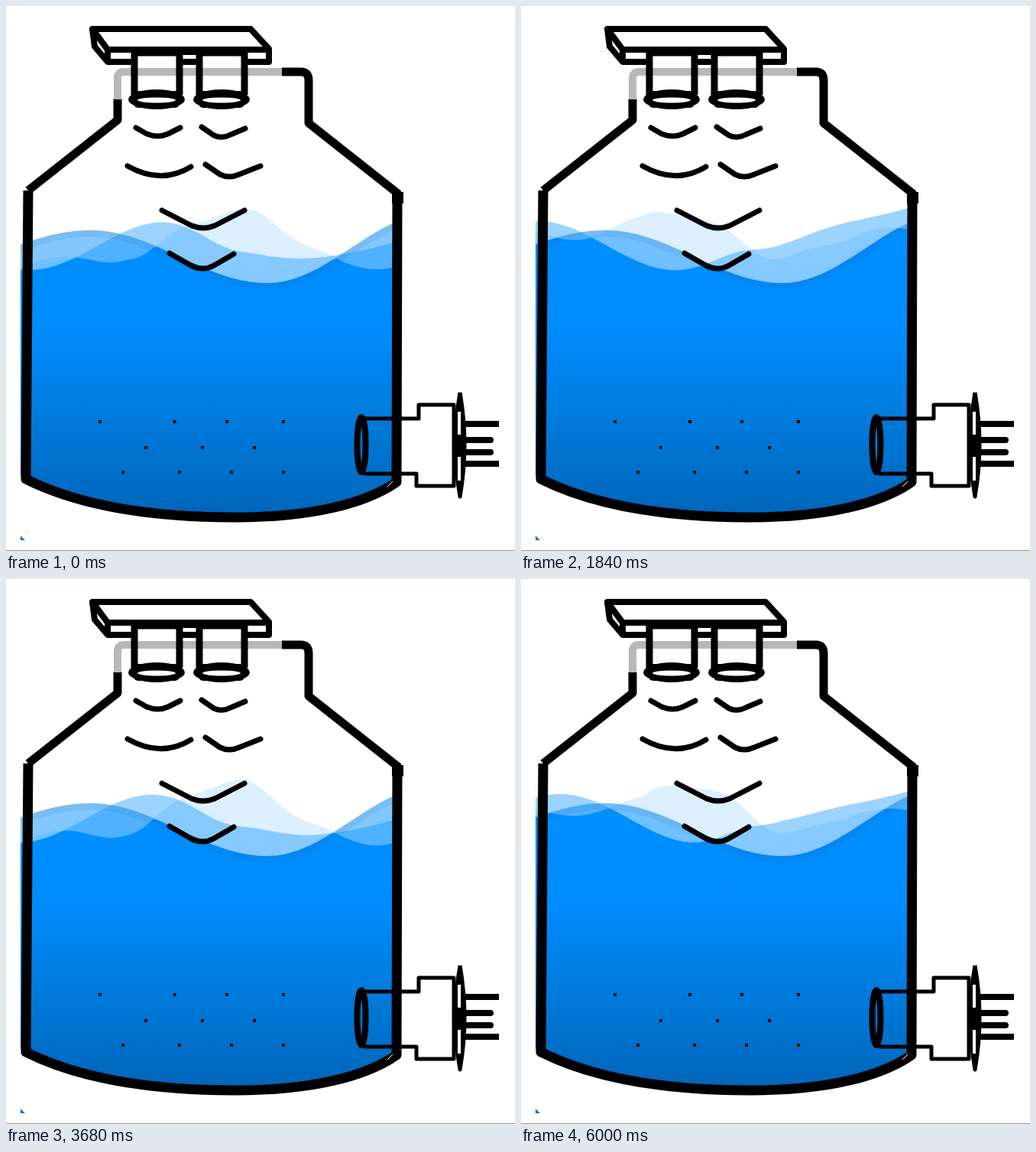
Recreate the animation shown at these times as an HTML page. Size 666x712 px, loop 6080 ms.

```html
<!DOCTYPE html>
<html lang="en">
<head>
<meta charset="utf-8">
<title>Water tank level sensor</title>
<style>
html, body { margin: 0; width: 100%; height: 100%; overflow: hidden; background: #fff; }
svg { display: block; width: 666px; height: 712px; }
.line { fill: none; stroke: #000; stroke-linejoin: round; }
.round { stroke-linecap: round; }
.soft { filter: blur(.7px); }
</style>
</head>
<body>
<svg viewBox="0 0 666 712">
  <defs>
    <linearGradient id="deep" gradientUnits="userSpaceOnUse" x1="0" y1="280" x2="0" y2="672">
      <stop offset="0" stop-color="#0090ff"/>
      <stop offset=".36" stop-color="#008cfd"/>
      <stop offset=".66" stop-color="#007bdc"/>
      <stop offset="1" stop-color="#0064b8"/>
    </linearGradient>
    <clipPath id="inside">
      <path d="M19 200H507V622C470 650 400 668 300 668C180 668 90 650 26 618L19 613Z"/>
    </clipPath>
    <g id="tube">
      <path fill="#fff" d="M-29 60H30V81H-29Z"/>
      <path class="line" stroke-width="9" d="M-29 116V61H30V116"/>
      <ellipse cy="122" rx="37" ry="13"/>
      <rect x="-30" y="111" width="60" height="22" rx="6"/>
      <ellipse cy="123" rx="25" ry="3.5" fill="#fff"/>
    </g>
  </defs>

  <g clip-path="url(#inside)" fill="url(#deep)">
    <path id="back" opacity=".14"/>
    <path id="middle" opacity=".39"/>
    <path id="front" opacity=".49"/>
    <path id="body"/>
    <path id="shade" fill="none" stroke="#2a4a80" stroke-width="9" opacity=".09"/>
  </g>

  <g class="soft">
    <!-- tank -->
    <path class="line" stroke-width="13" d="M29 241L26 618C90 650 180 668 300 668C400 668 470 650 511 622L512 246"/>
    <path class="line" stroke-width="11" d="M146 121V149L29 241M514 246L396 153V97Q396 86 386 86H361"/>
    <path d="M505 243H520V258H505Z"/>
    <path fill="none" stroke="#b8b8b8" stroke-width="10" d="M146 122V94Q146 86 155 86H361"/>
    <path d="M499 628L506 621" stroke="#fff"/>

    <!-- sensor -->
    <path class="line" stroke-width="8" style="fill:#fff" d="M113 30H320L344 56V73H133L116 53Z"/>
    <path class="line" stroke-width="8" d="M113 30L133 57H344M133 57V73"/>
    <path d="M224 57H252V64H224Z"/>
    <use href="#tube" x="197"/>
    <use href="#tube" x="282"/>

    <!-- echoes -->
    <g class="line round" stroke-width="7">
      <path d="M170 159L184 167Q199 173 212 167L228 159M256 158L272 169Q283 174 294 168L313 160"/>
      <path d="M159 209Q203 234 242 210M261 207L280 220Q292 226 305 220L333 209"/>
      <path d="M204 267L243 287Q258 293 273 287L312 267M214 323L242 339Q258 347 272 339L298 324"/>
    </g>

    <!-- bubbles -->
    <path class="line" stroke-width="4" d="M121 543h4M219 543h4M287 543h4M361 543h4M181 577h4M255 577h4M323 577h4M151 609h4M225 609h4M293 609h4M361 609h4"/>

    <!-- outlet -->
    <g class="line" stroke-width="5">
      <path d="M468 539H540V521H586V627H537V611H468"/>
      <ellipse cx="465" cy="573" rx="5.5" ry="36" stroke-width="8"/>
      <path style="fill:#000" d="M594 505Q606 573 594 641Q582 573 594 505"/>
      <path style="stroke:#fff" stroke-width="4" d="M593 530V560M593 589V620"/>
      <path stroke-width="8" d="M598 546H645M598 598H645"/>
      <path class="round" stroke-width="8" d="M590 567H634M590 583H634"/>
    </g>
  </g>

  <path fill="#1476c8" d="M19 692L25 698H19Z"/>
  <path stroke="#999" d="M0 711.5H666"/>
</svg>
<script>
const LOOP = 6080, STEP = 80, CYCLE = 3850;
const LEFT = 18, RIGHT = 508, FLOOR = 680;

const bell = (x, center, width) => Math.exp(-(((x - center) / width) ** 2));
const wave = (turns) => Math.cos(2 * Math.PI * turns);

// A swell bobs around its mean line; lag is the moment a crest passes x.
// Crests travel to the right, then the far side bobs in place.
const middle = {
  mean: x => 313 + 9 * bell(x, 330, 80) - 24 * (x / 503) ** 6,
  swing: x => 32 - 24 * bell(x, 320, 60),
  lag: x => Math.min(1613 + 10.6 * x, 5250)
};
const back = {
  mean: x => 318 - 36 * bell(x, 250, 95),
  swing: x => 22 + 10 * wave((x - 155) / 165),
  lag: x => Math.min(1600 + 13.5 * Math.max(0, x - 160), 5400)
};

const swell = ({ mean, swing, lag }, time) =>
  x => mean(x) - swing(x) * wave((time - lag(x)) / CYCLE);

// The front water line stands still: one crest, one trough, uneven slopes.
function front(x) {
  const left = 316.5 - 23.5 * wave((x - 110) / 420);
  const middle = 327.5 - 34.5 * wave((x - 110) / 464);
  const right = 316.5 + 45.5 * wave((x - 342) / 436);
  return x < 110 ? left : x < 342 ? middle : right;
}

function trace(curve) {
  const points = [];
  for (let x = LEFT; x <= RIGHT; x += 5) points.push(x + " " + curve(x).toFixed(2));
  return "M" + points.join("L");
}

const set = (id, d) => document.getElementById(id).setAttribute("d", d);
const fill = (id, curve) => set(id, trace(curve) + `V${FLOOR}H${LEFT}Z`);

fill("front", front);
set("shade", trace(x => front(x) + 4));

function draw(time) {
  const now = Math.floor(time % LOOP / STEP) * STEP;
  const a = swell(middle, now), b = swell(back, now);
  fill("middle", a);
  fill("back", b);
  fill("body", x => Math.max(a(x), b(x), front(x)));
}

const start = performance.now();
function tick() {
  draw(performance.now() - start);
  requestAnimationFrame(tick);
}
tick();
</script>
</body>
</html>
```
